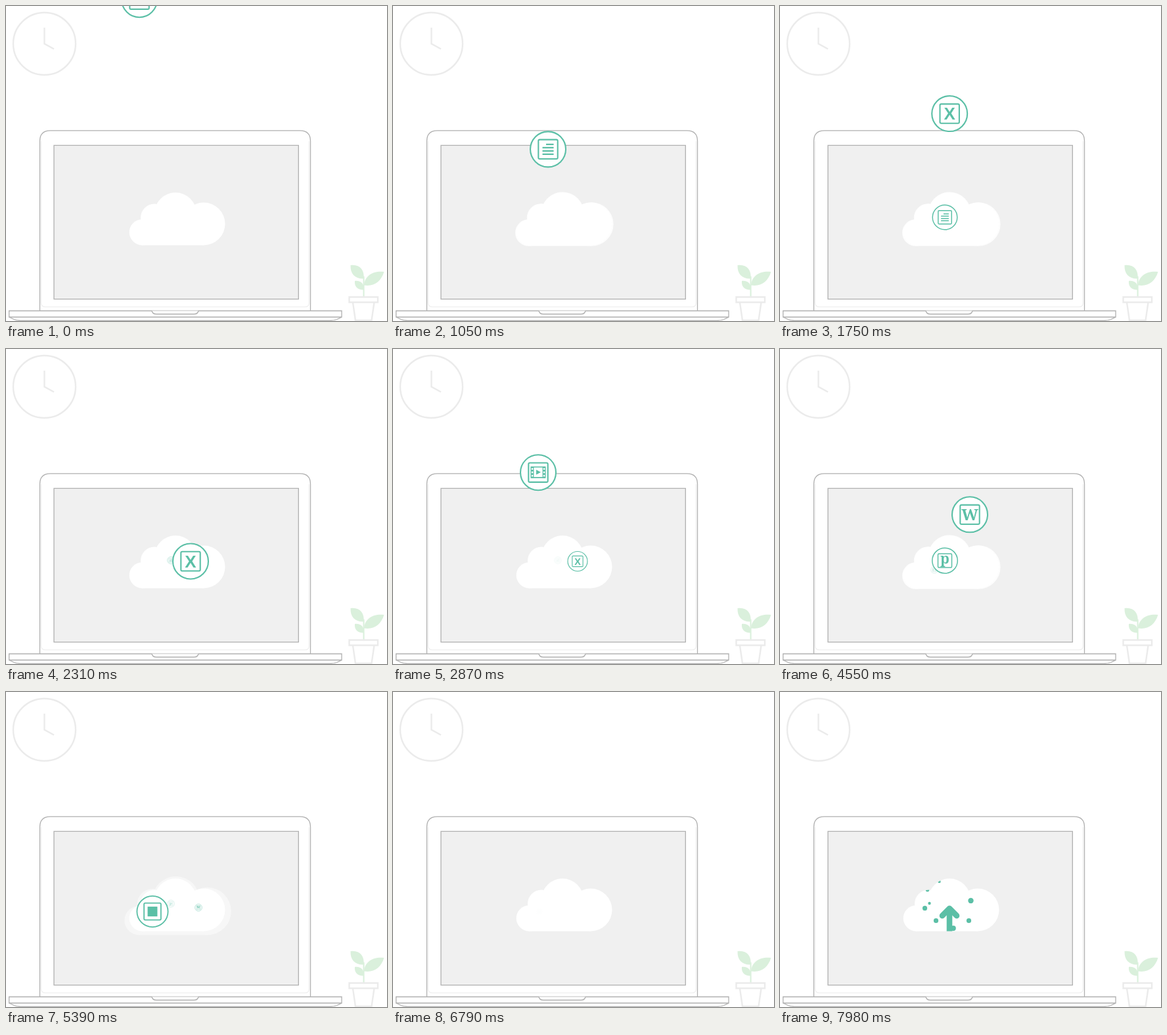
Recreate the animation shown at these times as an HTML page. Size 580x480 px, loop 8 s.

```html
<!DOCTYPE html>
<html lang="en">
<head>
<meta charset="utf-8">
<title>Files to the cloud</title>
<style>
  html, body { margin: 0; width: 100%; height: 100%; overflow: hidden; background: #fff; }
  svg { display: block; width: 580px; height: 480px; }
  .pale { fill: none; stroke: #ebebeb; stroke-width: 2.4; }
  .edge { fill: #fff; stroke: #b0b0b0; stroke-width: 1.3; }
  .soft { fill: none; stroke: #ededed; stroke-width: 1.2; }
  .line { fill: none; stroke: #5bbfa6; stroke-width: 2.1; }
  .teal { fill: #5bbfa6; }
  .slab { font: 800 24px "Noto Serif", serif; }
  .sans { font: 700 26px "Liberation Sans", Arial, sans-serif; }
  text { text-anchor: middle; }
</style>
</head>
<body>
<svg viewBox="0 0 580 480">
  <defs>
    <g id="cloud">
      <circle cx="207.5" cy="344.7" r="19.8"/>
      <circle cx="226" cy="322.5" r="21"/>
      <circle cx="258" cy="316.3" r="32"/>
      <circle cx="301" cy="332" r="32.5"/>
      <path d="M207 325H301V364.5H207Z"/>
    </g>
    <clipPath id="inside">
      <circle cx="207.5" cy="344.7" r="19.8"/>
      <circle cx="226" cy="322.5" r="21"/>
      <circle cx="258" cy="316.3" r="32"/>
      <circle cx="301" cy="332" r="32.5"/>
      <path d="M207 325H301V364.5H207Z"/>
    </clipPath>
  </defs>

  <!-- clock -->
  <g class="pale">
    <circle cx="58.5" cy="57.5" r="47.5"/>
    <path d="M58.5 33V57.5L73 65.5"/>
  </g>

  <!-- plant -->
  <g fill="#daf0dc">
    <path d="M543.5 412H545.6V443H543.5Z"/>
    <path d="M524.5 395C538 393 546 402 544.5 415.5C531 416 524 408 524.5 395Z"/>
    <path d="M575.5 405C560 403 546 410 545 425.5C560 428 571 420 575.5 405Z"/>
    <path d="M531 419C540 418 545.5 423 544.5 432.5C536 433 530 428 531 419Z"/>
  </g>
  <path class="pale" d="M522.5 443.5H566V451.5H522.5ZM528 452L532 479H556.5L560.5 452"/>

  <!-- laptop -->
  <path class="edge" d="M51.5 464V206Q51.5 189.8 67.5 189.8H447.5Q463.5 189.8 463.5 206V464"/>
  <path class="soft" d="M53.5 206V452Q53.5 458.5 60 458.5H455Q461.5 458.5 461.5 452V206"/>
  <path class="edge" d="M5 474L12 477.5Q16 479.4 22 479.4H493Q499 479.4 504 477.5L511 474"/>
  <path class="edge" d="M4.7 464.5H511V474H4.7Z"/>
  <path class="edge" d="M222 464.5Q223 469.5 229 469.5H286Q292 469.5 293 464.5"/>
  <path class="edge" style="fill:#f0f0f0" d="M73 212.3H445.3V446.7H73Z"/>

  <use id="ring" href="#cloud" fill="#fff"/>
  <use href="#cloud" fill="#fff"/>
  <g id="upload" clip-path="url(#inside)">
    <g id="dots" class="teal"></g>
    <g id="arrow" class="line" style="stroke-width:8.6">
      <path d="M258 331V410"/>
      <path d="M247 341L258 330L269 341" stroke-linecap="round" stroke-linejoin="round"/>
    </g>
  </g>
  <g id="icons"></g>
</svg>

<script>
const LOOP = 8000, END = 7980, TOP = -40;
const $ = id => document.getElementById(id);

const holes = [-9, 9].map(x => [-5.6, -0.4, 4.8].map(y =>
  `<rect x="${x - 1.2}" y="${y - 1.2}" width="2.4" height="2.6" fill="#fff"/>`).join('')).join('');

const art = {
  doc: '<path class="line" d="M-3 -7.5H8.5M-8.5 -2.5H8.5M-8.5 2.5H8.5M-8.5 7.5H8.5"/>',
  sheet: '<text class="teal sans" y="9.3">X</text>',
  film: '<path class="line" d="M-10.5 -8.5H10.5V7.7H-10.5Z" style="stroke-width:1.6"/>' +
    '<path class="teal" d="M-11.3 -9H-6.6V8.3H-11.3ZM6.6 -9H11.3V8.3H6.6ZM-3 -4.2L4 -0.4L-3 3.4Z"/>' + holes,
  slides: '<text class="teal slab" y="5.6" style="font-size:30px">p</text>',
  text: '<text class="teal slab" y="8.8">W</text>',
  page: '<rect class="teal" x="-8.5" y="-8.5" width="17" height="17"/>'
};

// art, entry x, landing x and y, entry time, landing time, shrink time
const drops = [
  ['doc', 198.7, 251, 322, 495, 1274, 1523],
  ['sheet', 229, 281, 323.5, 1312, 2094, 2537],
  ['film', 199.5, 235, 336.5, 2380, 3190, 3423],
  ['slides', 202.7, 251, 322.5, 3128, 3908, 4337],
  ['text', 273.7, 293, 328.5, 3922, 4715, 4760],
  ['page', 199, 223, 334.5, 4550, 5290, 5297]
];

// x, final y, radius, speed in px per ms
const bubbles = [
  [242.5, 289, 2.2, .09], [224.5, 301.5, 2.8, .08], [227.5, 322, 2.2, .07],
  [220.5, 329.5, 3.6, .08], [237.5, 348.5, 3.6, .07], [287.5, 348.5, 3.6, .07],
  [290.5, 318, 4.2, .09], [263.8, 360, 4, .08]
];

const clamp = v => Math.max(0, Math.min(1, v));
const span = (t, from, to) => clamp((t - from) / (to - from));
const mix = (a, b, p) => a + (b - a) * p;

$('icons').innerHTML = drops.map(([name]) =>
  `<g><circle class="line" r="27" style="fill:#fff"/>
   <rect class="line" x="-14.7" y="-14.7" width="29.4" height="29.4" rx="2"/>${art[name]}</g>`).join('');
$('dots').innerHTML = bubbles.map(([x, , r]) => `<circle cx="${x}" r="${r}"/>`).join('');
const icons = [...$('icons').children], dots = [...$('dots').children];

function draw(t) {
  drops.forEach(([, x0, x1, y1, enter, land, shrink], i) => {
    const p = span(Math.max(t, 560), enter, land);
    const size = mix(1, .2, span(t, shrink, shrink + 600));
    const alpha = 1 - span(t, shrink + 600, shrink + 1500);
    icons[i].setAttribute('transform',
      `translate(${mix(x0, x1, p)} ${mix(TOP, y1, p)}) scale(${size})`);
    icons[i].setAttribute('opacity', alpha);
  });

  // a soft copy of the cloud swells every 700 ms while files arrive
  const beat = (t + 350 + 40) % 700;
  const on = t > 1000 && t < 6700;
  const swell = 1 + .2 * span(beat, 0, 320);
  $('ring').setAttribute('transform',
    `translate(252 314) scale(${swell}) translate(-252 -314)`);
  $('ring').setAttribute('opacity', on ? 1 - span(beat, 0, 370) : 0);

  const left = END - t;
  $('upload').style.display = left < 1300 ? '' : 'none';
  bubbles.forEach(([, y, , v], i) => dots[i].setAttribute('cy', y + v * left));
  $('arrow').setAttribute('transform', `translate(0 ${.12 * left})`);
}

const start = performance.now();
function tick() {
  draw((performance.now() - start) % LOOP);
  requestAnimationFrame(tick);
}
draw(0);
requestAnimationFrame(tick);
</script>
</body>
</html>
```
